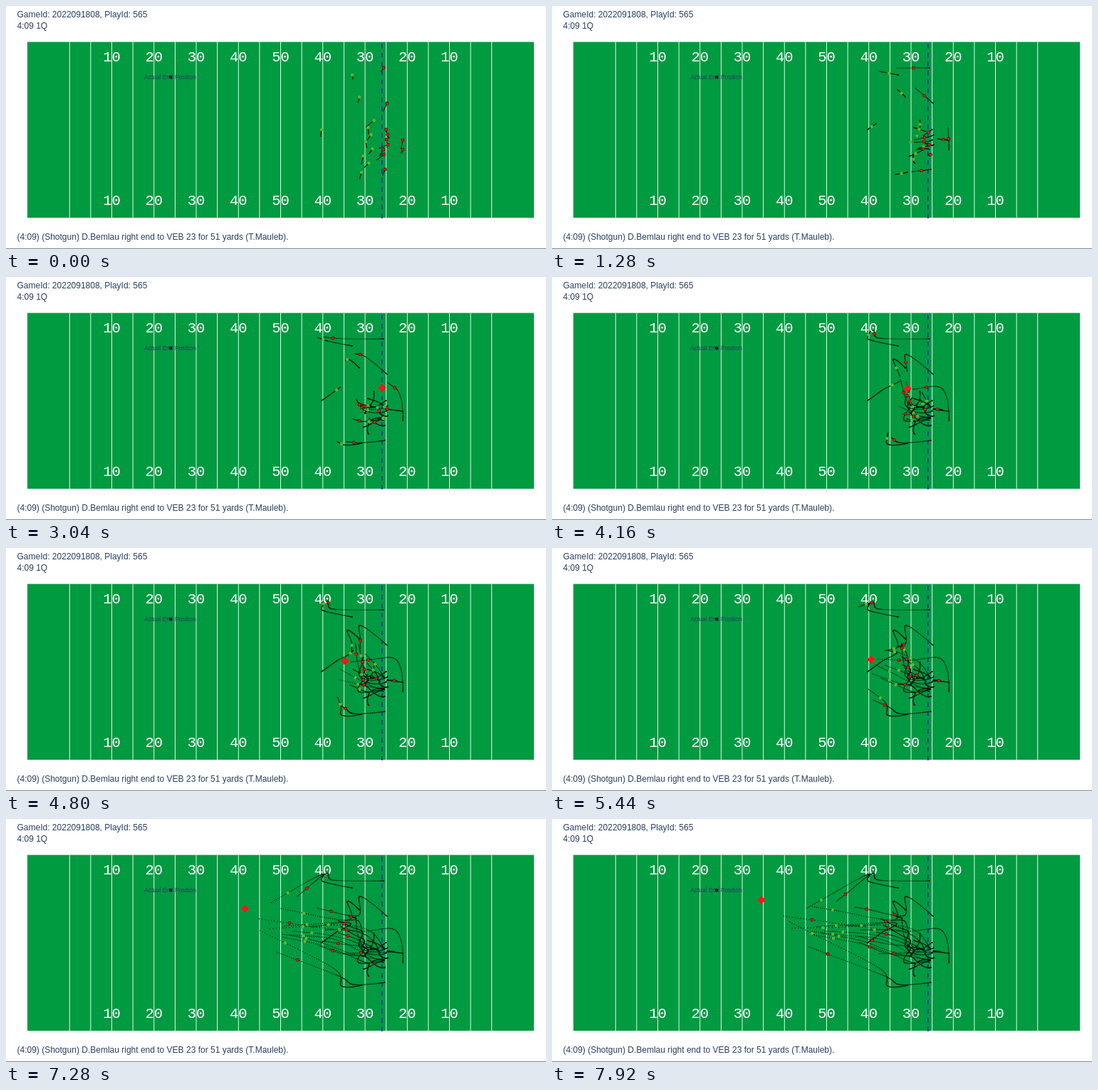
An HTML page with a canvas that plays this animation: 758 px wide and 342 px high, repeating every 8000 ms.

```html
<!DOCTYPE html>
<html lang="en">
<head>
<meta charset="utf-8">
<title>Play 565</title>
<style>
  html, body { margin: 0; width: 100%; height: 100%; overflow: hidden; background: #fff; }
  canvas, svg { position: absolute; left: 0; top: 0; }
  text { font: 12px "Liberation Sans", Arial, sans-serif; fill: #2a3f5f; }
  .small { font-size: 8.4px; text-anchor: middle; }
</style>
</head>
<body>
<canvas id="stage" width="758" height="342"></canvas>
<svg width="758" height="342">
  <text x="15.5" y="16">GameId: 2022091808, PlayId: 565</text>
  <text x="15.5" y="31.5">4:09 1Q</text>
  <text x="15.5" y="328.5">(4:09) (Shotgun) D.Bemlau right end to VEB 23 for 51 yards (T.Mauleb).</text>
  <text class="small" x="230.5" y="103">Actual End Position</text>
</svg>
<script>
const ctx = document.getElementById('stage').getContext('2d');
const STEP = 80, COUNT = 100, AHEAD = 10, SETTLE = 14, HANDOFF = 24;
const KEYS = [0, 38, 68, 99]; // set, handoff, cut upfield, chase
const FIELD = { x: 30, y: 50.6, w: 711, h: 247.4 };
const TAU = Math.PI * 2;

let seed = 7;
function rand(lo, hi) {
  seed = (seed * 16807) % 2147483647;
  return lo + (hi - lo) * seed / 2147483647;
}

// Smooth curve through one value per key time, starting at rest.
function curve(vals) {
  const last = KEYS.length - 1;
  const slope = KEYS.map((key, i) => {
    const b = Math.min(i + 1, last);
    return i ? (vals[b] - vals[i - 1]) / (KEYS[b] - KEYS[i - 1]) : 0;
  });
  return f => {
    let i = 0;
    while (i < last - 1 && f >= KEYS[i + 1]) i++;
    const h = KEYS[i + 1] - KEYS[i], u = (f - KEYS[i]) / h;
    const d = vals[i + 1] - vals[i], m = slope[i] * h, n = slope[i + 1] * h;
    return vals[i] + u * (m + u * (3 * d - 2 * m - n + u * (m + n - 2 * d)));
  };
}

// swirl: radius of the circling that blockers and rushers do mid-play.
function trace(points, swirl = 0) {
  const fx = curve(points.map(p => p[0])), fy = curve(points.map(p => p[1]));
  const phase = rand(0, TAU);
  return Array.from({ length: COUNT }, (_, f) => {
    const r = swirl * Math.sin(Math.PI * f / (COUNT - 1)), a = f / 11 + phase;
    return { x: fx(f) + r * Math.cos(a), y: fy(f) + r * Math.sin(a) };
  });
}

const players = [];

function run(team, points, swirl) {
  const path = trace(points, swirl);
  players.push({ team, path, lx: rand(-12, 2), ly: rand(3, 12) });
}

// A row of players at each key time: x and y of the first, step to the next, scatter in x.
function squad(team, count, rows) {
  for (let i = 0; i < count; i++) {
    run(team, rows.map(r => [r.x + i * r.dx + rand(-r.spread, r.spread), r.y + i * r.dy]), 5);
  }
}

// Defence: wide corner, slot, deep safety, far end, then the front seven.
run('green', [[486, 97], [445, 88], [441, 79], [378, 114]]);
run('green', [[496, 128], [479, 116], [480, 142], [394, 128]]);
run('green', [[443, 174], [464, 159], [481, 146], [399, 150]]);
run('green', [[499, 234], [471, 235], [461, 211], [365, 161]]);
squad('green', 7, [
  { x: 509, dx: 0, y: 161, dy: 10, spread: 12 },
  { x: 515, dx: 0, y: 176, dy: 5, spread: 14 },
  { x: 500, dx: -2, y: 147, dy: 7, spread: 16 },
  { x: 415, dx: 0, y: 150, dy: 3, spread: 46 },
]);

// Offence: two receivers, tight end, quarterback, back, then the line.
run('red', [[530, 87], [459, 86], [449, 77], [412, 106]]);
run('red', [[535, 137], [497, 109], [494, 136], [442, 127]]);
run('red', [[532, 230], [488, 233], [467, 221], [387, 190]]);
run('red', [[557, 189], [535, 186], [543, 187], [480, 189]]);
run('red', [[557, 202], [546, 156], [487, 158], [365, 142]]);
squad('red', 6, [
  { x: 533, dx: 0, y: 174, dy: 7, spread: 4 },
  { x: 511, dx: 0, y: 178, dy: 5, spread: 14 },
  { x: 496, dx: 1, y: 145, dy: 10, spread: 16 },
  { x: 484, dx: -7, y: 135, dy: 9, spread: 12 },
]);

const ball = trace([[558, 187], [528, 156], [448, 157], [294, 114]]);

function disc(x, y, r, fill) {
  ctx.fillStyle = fill;
  ctx.beginPath();
  ctx.arc(x, y, r, 0, TAU);
  ctx.fill();
}

function drawField() {
  const { x, y, w, h } = FIELD, yard = w / 120;
  ctx.fillStyle = '#fff';
  ctx.fillRect(0, 0, 758, 342);
  ctx.fillStyle = '#009a40';
  ctx.fillRect(x, y, w, h);

  ctx.fillStyle = '#fff';
  for (let n = 10; n <= 110; n += 5) ctx.fillRect(x + n * yard - .45, y, .9, h);

  ctx.font = '20.5px "Liberation Mono", "Courier New", monospace';
  ctx.textAlign = 'center';
  for (let n = 10; n <= 90; n += 10) {
    const label = n > 50 ? 100 - n : n, cx = x + (n + 10) * yard;
    ctx.fillText(label, cx, 78.2);
    ctx.fillText(label, cx, 280.2);
  }

  ctx.strokeStyle = '#1018dc';
  ctx.lineWidth = 1.5;
  ctx.setLineDash([6.3, 6.3]);
  ctx.beginPath();
  ctx.moveTo(527.8, y + h + 1);
  ctx.lineTo(527.8, y);
  ctx.stroke();
  ctx.setLineDash([]);

  disc(231, 100, 2.2, '#111');
  ctx.fillStyle = '#888';
  ctx.fillRect(0, 341, 758, 1);
}

// Steps so far, then the projected next second.
function drawTrail({ path, lx, ly }, f) {
  const dot = (x, y) => disc(x, y, .68, '#061206');
  for (let i = 0; i <= f; i++) dot(path[i].x, path[i].y);
  const now = path[f], prev = path[Math.max(0, f - 1)];
  const lead = Math.max(0, 1 - f / SETTLE) / AHEAD;
  const vx = now.x - prev.x + lx * lead, vy = now.y - prev.y + ly * lead;
  for (let k = 1; k <= AHEAD; k++) dot(now.x + vx * k, now.y + vy * k);
}

function drawMarker({ team, path }, f) {
  const { x, y } = path[f];
  if (team === 'red') {
    disc(x, y, 2.4, '#4a1208');
    disc(x, y, 1.8, '#e81410');
  } else {
    disc(x, y, 2.2, '#62b52c');
  }
}

function drawBall(f) {
  if (f < HANDOFF) return;
  const { x, y } = ball[f];
  ctx.fillStyle = '#ff1414';
  ctx.beginPath();
  for (let i = 0; i < 4; i++) {
    const a = i * TAU / 4;
    ctx.lineTo(x + 5.4 * Math.cos(a), y + 5.4 * Math.sin(a));
  }
  ctx.fill();
  ctx.fillRect(x - 1.8, y - 4.8, 3.6, 9.6);
  ctx.fillRect(x - 4.8, y - 1.8, 9.6, 3.6);
}

function draw(now) {
  const f = Math.floor(now / STEP) % COUNT;
  drawField();
  players.forEach(p => drawTrail(p, f));
  players.forEach(p => drawMarker(p, f));
  drawBall(f);
}

let start;
function tick(now) {
  start ??= now;
  draw(Math.max(0, now - start));
  requestAnimationFrame(tick);
}
draw(0);
requestAnimationFrame(tick);
</script>
</body>
</html>
```
